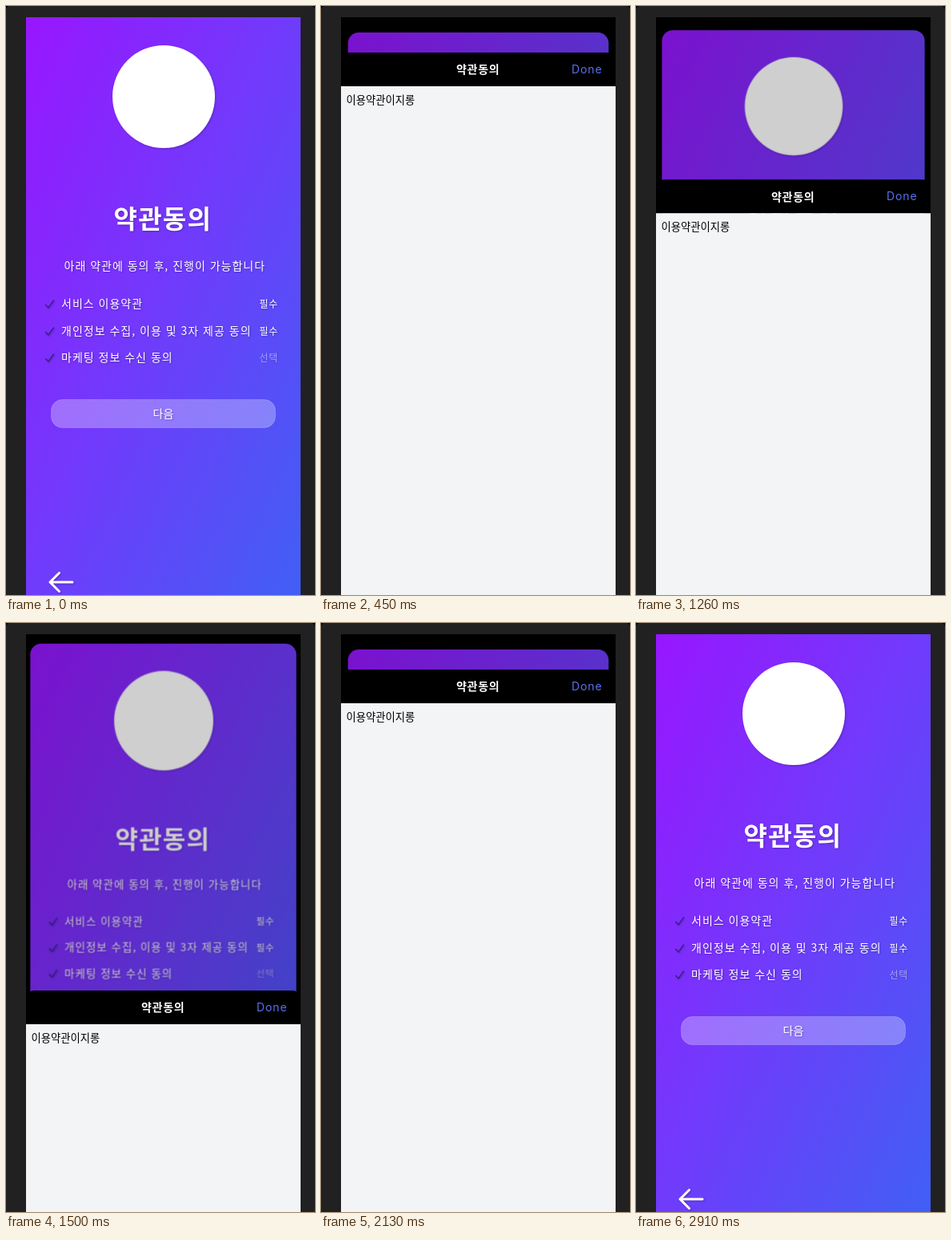
An HTML page that plays this animation: 386 by 734 pixels, repeating every 3.36 s.

```html
<!DOCTYPE html>
<html lang="ko">
<head>
<meta charset="utf-8">
<title>약관동의</title>
<style>
  html, body { margin: 0; width: 100%; height: 100%; overflow: hidden; background: #000; }
  svg { display: block; width: 386px; height: 734px; }
  text { font: 400 14px "Noto Sans CJK KR", "Noto Sans CJK", sans-serif; letter-spacing: 1px; fill: #fff; }
  .shadowed { filter: drop-shadow(1px 1px 1px rgba(0, 0, 0, .25)); }
  .medium { font-weight: 500; }
  .heading { font-size: 32px; font-weight: 700; letter-spacing: 1.2px; }
  .tag { font-size: 12px; letter-spacing: .7px; font-weight: 500; }
  .optional { opacity: .45; font-weight: 400; }
  .check { fill: none; stroke: #33217f; stroke-width: 1.3; stroke-linecap: round; stroke-linejoin: round; }
  .sheet-title { font-weight: 700; letter-spacing: .7px; }
  .done { font-family: Inter, sans-serif; letter-spacing: .9px; fill: #5870f2; }
  .terms { font-size: 13.3px; letter-spacing: 0; fill: #000; }
</style>
</head>
<body>
<svg viewBox="0 0 386 734">
  <defs>
    <linearGradient id="sky" x1="0" y1="0" x2="1" y2="1">
      <stop offset="0" stop-color="#9816ff"/>
      <stop offset=".5" stop-color="#6f3cfb"/>
      <stop offset="1" stop-color="#3f60f4"/>
    </linearGradient>
    <path id="tick" class="check" d="M49.5 1.5l3.5 3.5 6.5-9"/>
  </defs>

  <rect width="386" height="760" rx="5" fill="#212122"/>
  <rect x="25" y="14" width="343" height="720"/>

  <g id="page">
    <rect class="card" x="25" y="14" width="343" height="742" fill="url(#sky)"/>
    <rect x="56.5" y="490.5" width="280" height="35" rx="14" fill="#fff" fill-opacity=".29" stroke="#fff" stroke-opacity=".2"/>
    <g class="shadowed">
      <circle cx="197" cy="113" r="64" fill="#fff"/>
      <text class="heading" x="134.5" y="277">약관동의</text>
      <text x="72.5" y="329">아래 약관에 동의 후, 진행이 가능합니다</text>
      <use href="#tick" y="371"/>
      <text class="medium" x="69" y="376.3">서비스 이용약관</text>
      <text class="tag" x="316.5" y="376">필수</text>
      <use href="#tick" y="405"/>
      <text class="medium" x="69" y="410">개인정보 수집, 이용 및 3자 제공 동의</text>
      <text class="tag" x="316.5" y="409.7">필수</text>
      <use href="#tick" y="438"/>
      <text class="medium" x="69" y="443.3">마케팅 정보 수신 동의</text>
      <text class="tag optional" x="316.5" y="443">선택</text>
      <text class="medium" x="183.5" y="513.3" style="letter-spacing:0">다음</text>
      <path d="M83 718H56M66.500 706.500L55 718l11.500 11.500" fill="none" stroke="#fff" stroke-width="3" stroke-linecap="round" stroke-linejoin="round"/>
    </g>
    <rect class="card" id="shade" x="25" y="14" width="343" height="742"/>
  </g>

  <g id="sheet">
    <path d="M25 42V10a10 10 0 0 1 10-10H358a10 10 0 0 1 10 10V42z"/>
    <rect x="25" y="42" width="343" height="700" fill="#f3f4f6"/>
    <rect id="press" x="298" y="2" width="70" height="40" fill="#161919"/>
    <text class="sheet-title" x="169" y="26.300">약관동의</text>
    <text class="done" x="313" y="26">Done</text>
    <text class="terms" x="31.500" y="64.200">이용약관이지롱</text>
  </g>
</svg>
<script>
  const LOOP = 3360, STEP = 30;
  const OPEN = 58, CLOSED = 756, DRAG_START = 85, DRAG_END = 458;
  const $ = id => document.getElementById(id);
  const page = $('page'), shade = $('shade'), sheet = $('sheet'), press = $('press');
  const cards = document.querySelectorAll('.card');

  const span = (t, from, to) => Math.min(1, Math.max(0, (t - from) / (to - from)));
  const mix = (a, b, k) => a + (b - a) * k;
  const decay = x => 1 - (1 + x) * Math.exp(-x);
  // Critically damped spring, normalised to arrive exactly at 1.
  const spring = (u, stiffness) => decay(stiffness * u) / decay(stiffness);
  const dragEase = u => mix(u, u * u * (3 - 2 * u), .6);

  // y: top of the sheet, depth: how far the page is pushed back, dim: its darkening.
  function pose(t) {
    if (t < 1110 || t >= 2520) {
      const open = t < 1110
        ? spring(span(t, 130, 450), 7)
        : 1 - spring(span(t, 2550, 2910), 6.5);
      return { y: mix(CLOSED, OPEN, open), depth: open, dim: open ** .6 };
    }
    const y = t <= 1500
      ? mix(DRAG_START, DRAG_END, dragEase(span(t, 1110, 1500)))
      : mix(DRAG_END, OPEN, spring(span(t, 1500, 2130), 12.6));
    return { y, depth: 1 - .38 * (y - OPEN) / (DRAG_END - OPEN), dim: 1 };
  }

  function draw(t) {
    const { y, depth, dim } = pose(t);
    page.setAttribute('transform',
      `translate(196.5 ${14 + 19 * depth}) scale(${1 - .051 * depth}) translate(-196.5 -14)`);
    cards.forEach(card => card.setAttribute('rx', 14 * dim));
    shade.setAttribute('opacity', .19 * dim);
    sheet.setAttribute('transform', `translate(0 ${y})`);
    press.setAttribute('visibility', t >= 2580 && t < 2700 ? 'visible' : 'hidden');
  }

  let start;
  function tick(now) {
    start ??= now;
    draw(Math.floor((now - start) % LOOP / STEP) * STEP);
    requestAnimationFrame(tick);
  }
  draw(0);
  requestAnimationFrame(tick);
</script>
</body>
</html>
```
